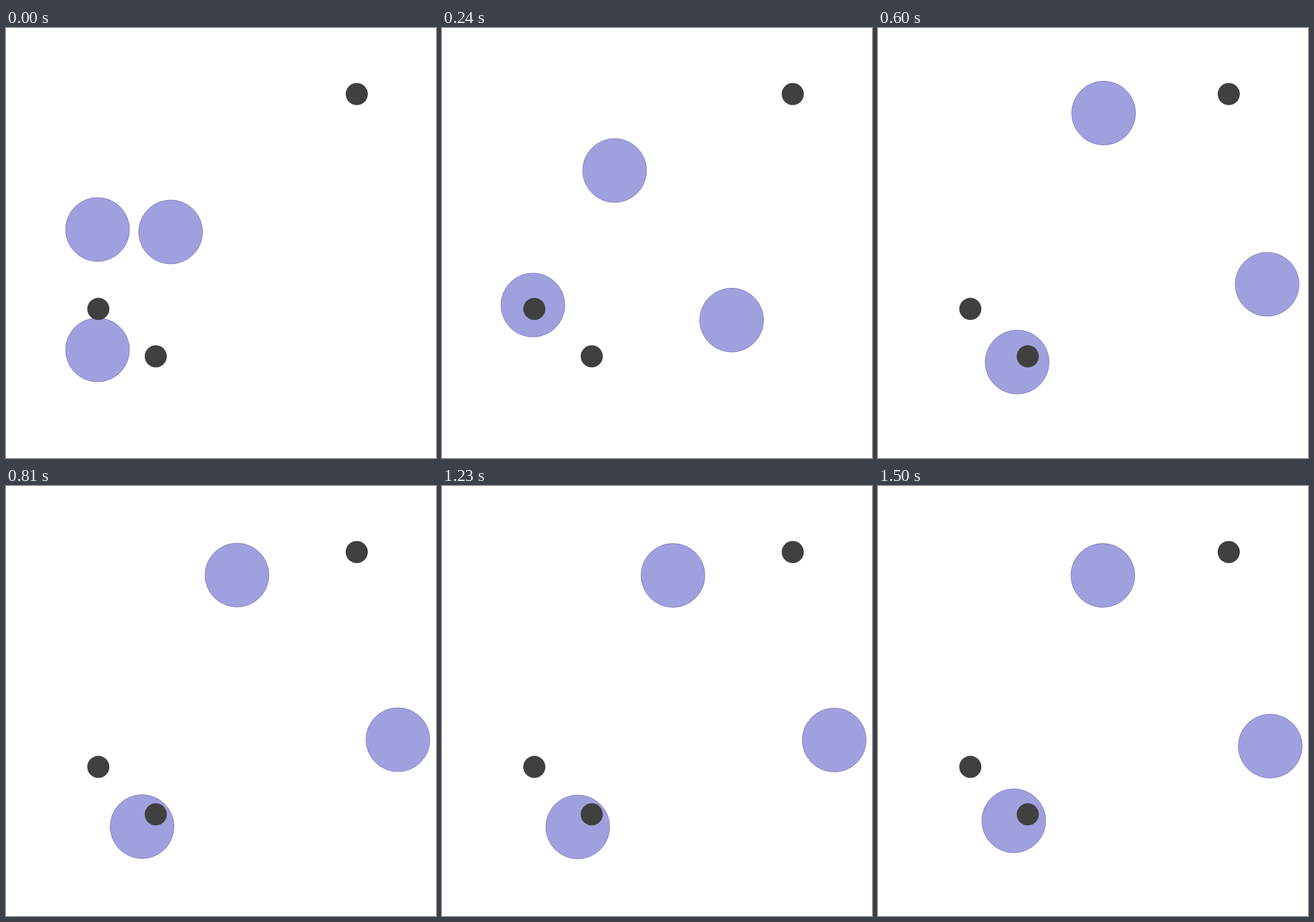
Recreate the animation shown at these times as an HTML page without scripts. Size 700 by 700 pixels, loop 1.53 s.

```html
<!DOCTYPE html>
<html lang="en">
<head>
<meta charset="utf-8">
<title>Discs and dots</title>
<style>
  @property --x { syntax: "<number>"; inherits: false; initial-value: 0; }
  @property --y { syntax: "<number>"; inherits: false; initial-value: 0; }
  @property --tick { syntax: "<number>"; inherits: false; initial-value: 0; }

  html, body { margin: 0; width: 100%; height: 100%; overflow: hidden; background: #fff; }
  svg { display: block; width: 100vw; height: 100vh; }

  .dot { fill: #404040; }

  /* Each disc follows its path, then settles into a jitter that flips every tick. */
  .disc {
    --jitter: calc(5 * clamp(0, (var(--tick) - 15) / 6, 1) * cos(var(--tick) * 180deg));
    fill: #a1a0de;
    stroke: #8482c6;
    stroke-width: 1;
    transform: translate(
      calc((var(--x) + var(--jitter) * var(--jx)) * 1px),
      calc((var(--y) + var(--jitter) * var(--jy)) * 1px));
    animation: 1530ms -2ms infinite;
    animation-name: var(--path), tick;
    animation-timing-function: steps(4), steps(51);
  }
  .top    { --jx: -1; --jy: 0;  animation-name: top, tick; }
  .right  { --jx: 0;  --jy: 1;  animation-name: right, tick; }
  .bottom { --jx: 0;  --jy: -1; animation-name: bottom, tick; }

  @keyframes tick { from { --tick: 0; } to { --tick: 51; } }

  @keyframes top {
    0%     { --x: 149; --y: 328; }
    7.84%  { --x: 210; --y: 288; }
    15.68% { --x: 281; --y: 232; animation-timing-function: steps(3); }
    21.56% { --x: 324; --y: 183; animation-timing-function: steps(3); }
    27.45% { --x: 362; --y: 141; animation-timing-function: steps(2); }
    31.37% { --x: 371; --y: 125; animation-timing-function: steps(2); }
    35.29% { --x: 372; --y: 135; }
    43.13% { --x: 371; --y: 142; animation-timing-function: steps(5); }
    52.94% { --x: 371; --y: 145; animation-timing-function: steps(9); }
    70.58%, 100% { --x: 371; --y: 145.5; }
  }

  @keyframes right {
    0%     { --x: 268; --y: 332; }
    7.84%  { --x: 372; --y: 428; }
    15.68% { --x: 471.5; --y: 475.5; animation-timing-function: steps(3); }
    21.56% { --x: 545; --y: 448; animation-timing-function: steps(3); }
    27.45% { --x: 609; --y: 402; animation-timing-function: steps(2); }
    31.37% { --x: 622; --y: 405; animation-timing-function: steps(2); }
    35.29% { --x: 630; --y: 410; }
    43.13% { --x: 637; --y: 416; animation-timing-function: steps(5); }
    52.94% { --x: 638; --y: 418; animation-timing-function: steps(9); }
    70.58%, 100% { --x: 638.5; --y: 418.5; }
  }

  @keyframes bottom {
    0%     { --x: 149; --y: 524; }
    7.84%  { --x: 114; --y: 478; }
    15.68% { --x: 148; --y: 451; animation-timing-function: steps(3); }
    21.56% { --x: 198; --y: 480; animation-timing-function: steps(3); }
    27.45% { --x: 244; --y: 523; animation-timing-function: steps(2); }
    31.37% { --x: 238; --y: 537; animation-timing-function: steps(2); }
    35.29% { --x: 230; --y: 547; }
    43.13% { --x: 223; --y: 549; animation-timing-function: steps(5); }
    52.94% { --x: 221.5; --y: 549.5; animation-timing-function: steps(9); }
    70.58%, 100% { --x: 221; --y: 550; }
  }
</style>
</head>
<body>
<svg viewBox="0 0 700 700">
  <circle class="disc top" r="52"/>
  <circle class="disc right" r="52"/>
  <circle class="disc bottom" r="52"/>
  <circle class="dot" cx="571" cy="107.5" r="18"/>
  <circle class="dot" cx="150.3" cy="457.3" r="18"/>
  <circle class="dot" cx="243.8" cy="534.5" r="18"/>
</svg>
</body>
</html>
```
